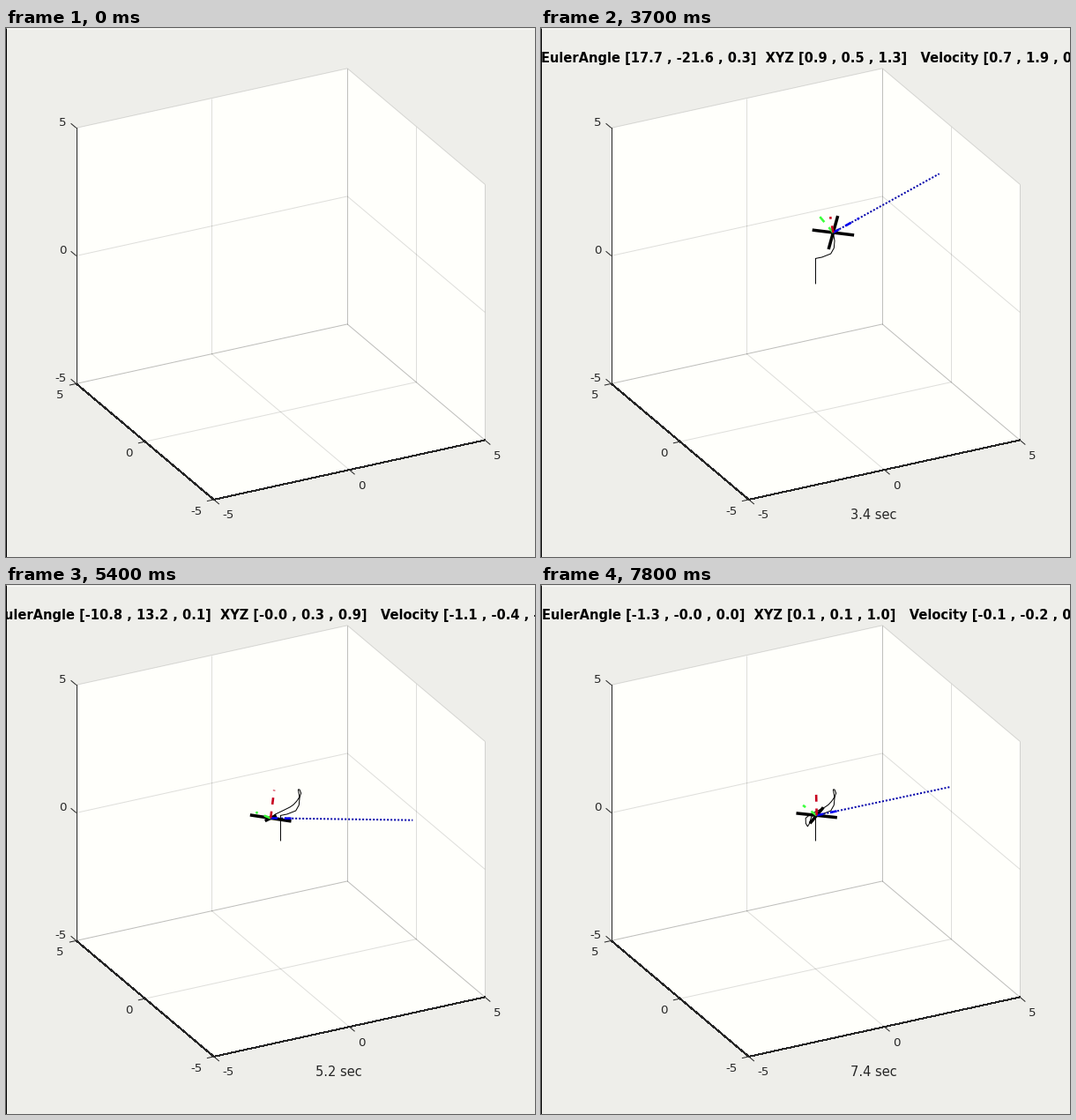
A matplotlib script that plays this animation: 600x600 px, repeating every 8000 ms.

```python
import numpy as np
import matplotlib.pyplot as plt
from matplotlib.animation import FuncAnimation

SIZE, DPI, FRAMES, INTERVAL = 600, 100, 80, 100
DT = 0.2
INK = "#262626"
plt.rcParams["font.family"] = "DejaVu Sans"

# Screen pixels per unit along the world x, y and z axes
AXES = np.array([[30.75, -6.75], [-15.6, -13.15], [0, -29]])
CENTER = np.array([311.75, 290.4])

# Bursts of simulation steps: first frame, last frame, step count
BURSTS = [(6, 16, 7), (18, 22, 4), (25, 35, 7), (37, 45, 6), (48, 56, 5),
          (59, 60, 2), (63, 68, 4), (71, 75, 3), (78, 78, 1)]
STEPS = np.concatenate([np.floor(np.linspace(*b) + 1e-6) for b in BURSTS])

# Key poses of the manoeuvre: step, x, y, z, roll, pitch
POSES = np.array([
    (12, 0, 0, 1, 0, 0),
    (14, 0.65, 0.175, 0.955, -4, 5),
    (16, 0.94, 0.47, 1.26, 17.7, -21.6),
    (17, 1.08, 0.85, 1.376, 23, -19.4),
    (19, 1.15, 0.78, 1.25, 8, -6),
    (22, 0.78, 0.61, 0.96, -0.3, 1.8),
    (23, 0.58, 0.47, 0.976, -2, 4.4),
    (26, -0.25, 0.23, 0.85, -12, 14),
    (28, -0.3, -0.01, 0.645, -0.9, 1.8),
    (29, -0.16, 0.15, 0.638, 11, -8.2),
    (31, 0, 0.3, 0.81, 4, -4),
    (34, 0.1, 0.18, 0.94, 2.2, -1.03),
    (37, 0.07, 0.06, 0.96, -3.3, 0.4),
])


def hermite(keys, values, at):
    """Smooth curve through the key values, starting from rest."""
    slope = np.gradient(values, keys, axis=0)
    slope[0] = 0
    at = np.clip(at, keys[0], keys[-1])
    i = np.clip(np.searchsorted(keys, at, side="right") - 1, 0, len(keys) - 2)
    h = (keys[i + 1] - keys[i])[:, None]
    t = (at - keys[i])[:, None] / h
    ease = t * t * (3 - 2 * t)
    return (values[i] * (1 - ease) + values[i + 1] * ease
            + h * t * (1 - t) * (slope[i] * (1 - t) - slope[i + 1] * t))


def fly():
    n = np.arange(len(STEPS) - 1)
    pose = hermite(POSES[:, 0], POSES[:, 1:], n)
    path, tilt = pose[:, :3], pose[:, 3:]
    climb = 1 / (1 + np.exp(1.55 * (5.9 - n)))
    path[:, 2] = np.where(n < POSES[0, 0], climb, path[:, 2])
    yaw = np.interp(n, [12, 16, 22, 28, 34], [0, 0.3, -0.2, 0.4, 0])
    return path, np.column_stack([tilt, yaw])


PATH, EULER = fly()
VELOCITY = np.diff(PATH, axis=0) / DT


def pt(px):
    return px * 72 / DPI


def project(points):
    return CENTER + np.asarray(points, float) @ AXES


def rotation(angles):
    """Columns are the body axes for roll, pitch and yaw."""
    (cr, cp, cy), (sr, sp, sy) = np.cos(np.radians(angles)), np.sin(np.radians(angles))
    rx = np.array([[1, 0, 0], [0, cr, -sr], [0, sr, cr]])
    ry = np.array([[cp, 0, sp], [0, 1, 0], [-sp, 0, cp]])
    rz = np.array([[cy, -sy, 0], [sy, cy, 0], [0, 0, 1]])
    return rz @ ry @ rx


fig = plt.figure(figsize=(SIZE / DPI, SIZE / DPI), dpi=DPI, facecolor="#eeeeea")
ax = fig.add_axes([0, 0, 1, 1])
ax.axis("off")
# The small offset makes upright lines snap to the right pixel column
ax.set_xlim(0.3, SIZE + 0.3)
ax.set_ylim(SIZE, 0)


def line(points=((0, 0), (0, 0)), color="k", width=1.0, **kw):
    x, y = np.transpose(points)
    return ax.plot(x, y, color=color, lw=pt(width), solid_capstyle="butt",
                   dash_capstyle="butt", **kw)[0]


def label(x, y, s, px=13.33, color=INK, **kw):
    return ax.text(x, y, s, fontsize=pt(px), color=color, va="baseline", **kw)


def draw_box():
    walls = [
        lambda a, b: (a, b, -5),
        lambda a, b: (a, 5, b),
        lambda a, b: (5, a, b),
    ]
    for wall in walls:
        corners = [wall(-5, -5), wall(5, -5), wall(5, 5), wall(-5, 5)]
        ax.fill(*project(corners).T, color="#fffffb", lw=0, zorder=0)
        for v in (-5, 0, 5):
            line(project([wall(v, -5), wall(v, 5)]), INK, alpha=0.15, zorder=1)
            line(project([wall(-5, v), wall(5, v)]), INK, alpha=0.15, zorder=1)

    rulers = [(-5, 5, 5), (-5, 5, -5), (-5, -5, -5), (5, -5, -5)]
    for ends in zip(rulers, rulers[1:]):
        line(project(ends), INK, zorder=2, antialiased=False)
    out_x = -AXES[0] / np.hypot(*AXES[0]) * 8
    out_y = AXES[1] / np.hypot(*AXES[1]) * 8
    for i, v in enumerate((-5, 0, 5)):
        ticks = [((v, -5, -5), -out_y), ((-5, v, -5), out_x), ((-5, 5, v), out_y)]
        for spot, out in ticks:
            start = project(spot)
            line([start, start + out], INK, zorder=2)
        label(245.2 + 154 * i, 556.5 - 33.6 * i, str(v), ha="left")
        label(222.5 - 78.5 * i, 551.5 - 66 * i, str(v), ha="right")
        label(68.7, 400.7 - 145 * i, str(v), ha="right")

    line([(0, 0.6), (SIZE + 1, 0.6)], "#f9f9f7", zorder=2)
    line([(0, 0), (0, SIZE)], "k", zorder=3)


draw_box()
trail = line(zorder=4)
sight = line(color="#0000aa", width=2, ls=(0, (1, 1)), zorder=5)
arms = [line(width=3.5, zorder=6) for _ in range(2)]
body = [line(color=c, width=2.6, ls=(0, (3, 3)), zorder=7)
        for c in ("#0000f0", "#3cff3c", "#c8001e")]
title = label(313, 39, "", 14.67, "k", ha="center", weight="bold")
clock = label(378, 557, "", 14.67, ha="center")
moving = [trail, sight, *arms, *body, title, clock]


def place(artist, points):
    artist.set_data(*project(points).T)


def triple(values):
    return "[" + " , ".join(f"{v:.1f}" for v in values) + "]"


def update(frame):
    done = int(np.sum(STEPS <= frame))
    for artist in moving:
        artist.set_visible(done > 0)
    if not done:
        return moving

    n = max(done - 2, 0)
    pos, rot = PATH[n], rotation(EULER[n])
    fwd, left, _ = rot.T
    place(trail, PATH[:n + 1])
    # The line of sight ends at the x = 5 wall
    place(sight, [pos, pos + fwd * (5 - pos[0]) / fwd[0]])
    for arm, d in zip(arms, (fwd - left, fwd + left)):
        place(arm, [pos - d / 2, pos + d / 2])
    for axis, d in zip(body, rot.T):
        place(axis, [pos, pos + d])

    # The readout trails the drawing by one step
    k = max(n - 1, 0)
    title.set_text(f"EulerAngle {triple(EULER[k])}  XYZ {triple(PATH[k])}   "
                   f"Velocity {triple(VELOCITY[k])}")
    clock.set_text(f"{n * DT:.1f} sec")
    return moving


anim = FuncAnimation(fig, update, frames=FRAMES, interval=INTERVAL,
                     init_func=lambda: update(0), repeat=True, repeat_delay=0)
plt.show()
```
